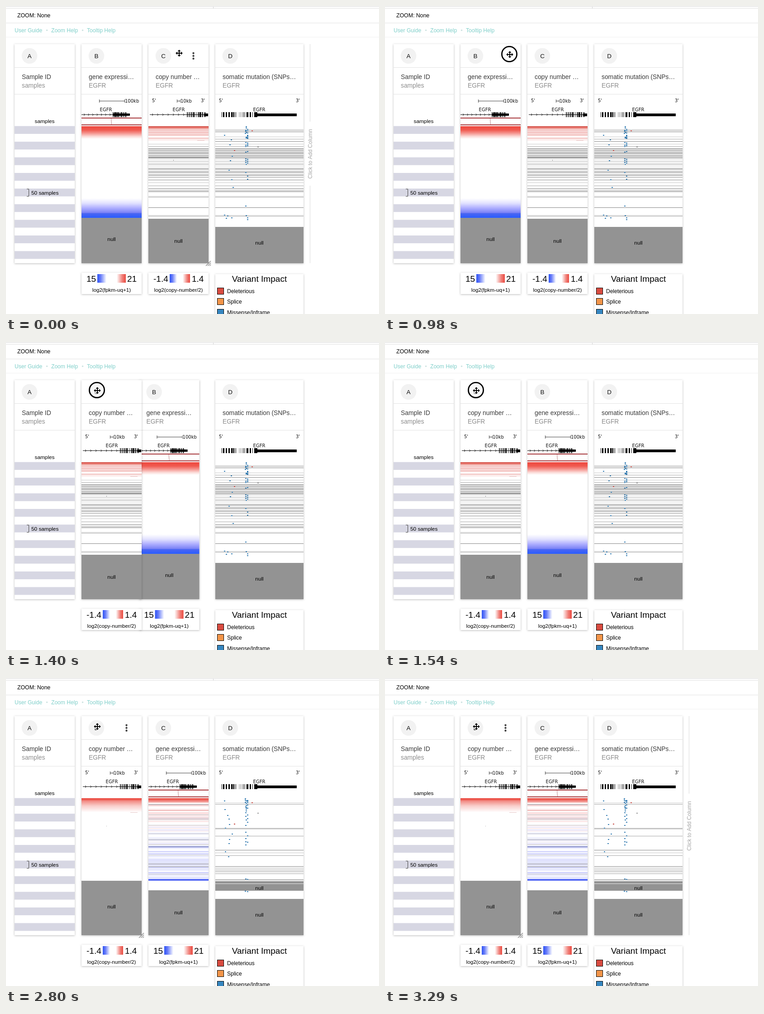
An HTML page with a canvas that plays this animation: 825 by 679 pixels, repeating every 3.36 s.

```html
<!DOCTYPE html>
<html lang="en">
<head>
<meta charset="utf-8">
<title>Column reorder</title>
<style>
html, body { margin: 0; width: 100%; height: 100%; overflow: hidden; background: #fff; }
canvas { display: block; }
</style>
</head>
<body>
<canvas id="stage" width="825" height="679"></canvas>
<script>
const g = document.getElementById('stage').getContext('2d');
const LOOP = 3360, STEP = 70, W = 133;
const SANS = '"Liberation Sans", Arial, sans-serif';
const WIDE = '"DejaVu Sans", sans-serif';
const BLUE = '#3a80b4', RED = '#c9504a';

// progress of a soft move between two times
function ease(t, from, to) {
  const p = Math.min(1, Math.max(0, (t - from) / (to - from)));
  return p * p * (3 - 2 * p);
}
const mix = (a, b, p) => a + (b - a) * p;

function random(seed) {
  return () => (seed = (seed * 16807) % 2147483647) / 2147483647;
}

function rect(x, y, w, h, fill) {
  g.fillStyle = fill;
  g.fillRect(x, y, w, h);
}

function text(s, x, y, size, fill = '#000', align = 'left', family = SANS) {
  g.font = size + 'px ' + family;
  g.textAlign = align;
  g.fillStyle = fill;
  g.fillText(s, x, y);
}
const small = (s, x, y, align) => text(s, x, y, 10, '#111', align, WIDE);

function disc(x, y, r, fill) {
  g.fillStyle = fill;
  g.beginPath();
  g.arc(x, y, r, 0, 7);
  g.fill();
}

function stroke(points, color = '#222') {
  g.strokeStyle = color;
  g.lineWidth = 1;
  g.beginPath();
  for (let i = 0; i < points.length; i += 2) g.lineTo(points[i], points[i + 1]);
  g.stroke();
}

// stops: position, colour, position, colour ...
function fade(x, y, w, h, stops, across) {
  const f = across ? g.createLinearGradient(x, 0, x + w, 0) : g.createLinearGradient(0, y, 0, y + h);
  for (let i = 0; i < stops.length; i += 2) f.addColorStop(stops[i], stops[i + 1]);
  rect(x, y, w, h, f);
}

function panel(x, y, w, h) {
  g.save();
  g.shadowColor = 'rgba(0,0,0,.27)';
  g.shadowBlur = 4;
  g.shadowOffsetY = 1;
  rect(x, y, w, h, '#fff');
  g.restore();
}

function card(x, w, letter, title, sub) {
  panel(x, 84, w, 483);
  rect(x, 135, w, 1, '#e2e2e2');
  rect(x, 194, w, 1, '#e2e2e2');
  disc(x + 33, 110, 17.3, '#f2f2f2');
  text(letter, x + 33, 115, 13.5, '#111', 'center');
  text(title, x + 16, 161, 13.85, '#3a3a3a');
  text(sub, x + 16, 180, 13.8, '#8c8c8c');
}

function nullBlock(x, w, top, bottom, label) {
  rect(x, top, w, bottom - top, '#939393');
  text('null', x + w / 2, label, 11.8, '#000', 'center');
}

function hover(x) {
  for (const y of [104, 110, 116]) disc(x + 99.5, y, 2.2, '#444');
  for (const d of [0, 4, 8]) stroke([x + 127 + d, 573, x + 138, 562 + d], '#333');
}

function exons(from, to, gap, seed, color = '#000') {
  const rnd = random(seed);
  for (let x = from; x < to - 1;) {
    const w = 1 + Math.floor(rnd() * 2.6);
    rect(x, 234, w, 11, color);
    x += w + 1 + Math.floor(rnd() * gap);
  }
}

function intron(from, to, gap) {
  rect(from, 239, to - from, 1, '#111');
  for (let x = from + 5; x < to - 3; x += gap) stroke([x, 237, x + 2.5, 239.5, x, 242]);
}

function scale(from, to, label) {
  rect(from, 209, to - from, 1, '#444');
  rect(from, 206, 1, 7, '#444');
  rect(to, 206, 1, 7, '#444');
  small(label, to + 1, 213);
}

// zones: [first, end, spacing]
function rows(x, w, zones, color = '#000') {
  let n = 0;
  for (const [from, to, gap] of zones)
    for (let y = from; y < to; y += gap) {
      g.globalAlpha = .22 + .13 * (n++ % 3);
      rect(x, Math.floor(y), w, 1, color);
    }
  g.globalAlpha = 1;
}

const dot = (x, y, color = BLUE) => rect(Math.round(x) - 1, Math.round(y) - 1, 3, 2, color);

function dotStack(zones, seed) {
  const rnd = random(seed);
  for (const [from, to, gap] of zones)
    for (let y = from; y < to; y += gap) {
      const r = rnd();
      if (r < .65) dot(529 + rnd() * 2, y);
      if (r > .35) dot(534, y + 1);
    }
}

function strayDots(count, from, to, seed) {
  const rnd = random(seed);
  for (let i = 0; i < count; i++) dot(483 + rnd() * 26, mix(from, to, (i + rnd()) / count));
}

function page() {
  rect(0, 0, 825, 679, '#fff');
  for (const [y, color] of [[1, '#dadada'], [5, '#e0e0e0'], [37, '#e2e2e2'], [68, '#f0f0f0']])
    rect(0, y, 825, 1, color);
  rect(458, 1, 1, 4, '#d0d0d0');
  text('ZOOM: None', 25, 25, 12.3);
  [['User Guide', 19], ['Zoom Help', 100], ['Tooltip Help', 179]].forEach(([s, x], i) => {
    text(s, x, 57.5, 12.1, '#80cfca');
    if (i) disc(x - 9.5, 53.5, 1.8, '#cfe4e2');
  });
}

function sampleColumn() {
  card(19, W, 'A', 'Sample ID', 'samples');
  text('samples', 85.5, 258, 11.8, '#000', 'center');
  for (let i = 0; i < 9; i++) rect(19, 264.7 + i * 34.45, W, 17.2, '#d7d7e3');
  stroke([46, 403.5, 50.5, 403.5, 50.5, 419.5, 46, 419.5], '#444');
  text('50 samples', 56, 415.5, 11.8);
}

function mixedRows(x) {
  const rnd = random(77);
  fade(x, 265, W, 10, [0, '#e8453b', .4, '#ee6a62', 1, '#f7bcb8']);
  for (let y = 274; y < 443; y++) {
    const p = (y - 265) / 180, r = rnd(), a = rnd();
    if (r < .4) continue;
    const warm = rnd() > p * 1.7 - .1;
    const alpha = .06 + a * (warm ? .5 * Math.max(0, 1 - p * 2.3) : .34 * p);
    rect(x, y, W, 1, r > .9 ? 'rgba(70,70,80,.35)' : `rgba(${warm ? '226,70,70' : '70,80,240'},${alpha})`);
  }
  rect(x, 291, W, 1, '#df6763');
  rect(x, 371, W, 2, '#7f87c4');
  rect(x, 443, W, 4, '#5b6ff5');
}

function expression(x, letter, sorted) {
  card(x, W, letter, 'gene expressi…', 'EGFR');
  scale(x + 39, x + 95, '100kb');
  small('EGFR', x + 54, 232, 'center');
  intron(x, x + 69, 9.5);
  exons(x + 69, x + 99, 2, 11);
  rect(x + 69, 237, 38, 5, '#000');
  rect(x, 246, W, 2, '#a83a3e');
  rect(x, 261, W, 2, '#a83a3e');
  stroke([x + 65.5, 248, x + 66.5, 261], '#b98386');
  if (sorted) {
    mixedRows(x);
    nullBlock(x, W, 468, 567, 520.5);
  } else {
    fade(x, 265, W, 28, [0, '#ee473d', .3, '#f05a50', .55, '#f5948e', .8, '#fbd9d6', 1, '#fff']);
    fade(x, 424, W, 43, [0, '#fff', .25, '#e2e2ff', .5, '#aeaeff', .73, '#7c83f6', .78, '#4a65f2', 1, '#295cff']);
    nullBlock(x, W, 467, 567, 517.5);
  }
}

// sample rows without a call, shared by two columns
const greyZones = [[304, 314, 5], [314, 336, 1.8], [339, 356, 4.5], [357, 379, 2.4],
  [383, 404, 6.6], [405, 411, 2], [419, 422, 2], [444, 445, 1], [461, 464, 2]];

function copyNumber(x, letter, sorted) {
  card(x, W, letter, 'copy number …', 'EGFR');
  small("5'", x + 8, 211.5);
  small("3'", x + 116, 211.5);
  scale(x + 63, x + 70, '10kb');
  small('EGFR', x + 67, 232, 'center');
  intron(x + 3, x + 85, 11.5);
  exons(x + 85, x + 127, 3, 23);
  rect(x + 85, 239, 46, 1, '#000');
  rect(x + 123, 237, 9, 6, '#000');
  rect(x + 108, 296, 16, 1, '#e6c8c8');
  if (sorted) {
    fade(x, 265, W, 31, [0, '#ea4238', .12, '#ee6259', .2, '#f28c85', .55, '#f9cecb', 1, '#fff']);
    rect(x + 55, 326, 1, 1, '#999');
    nullBlock(x, W, 447, 567, 508);
  } else {
    fade(x, 265, W, 7, [0, '#c9473f', .3, '#e2635a', .6, '#eb8d86', 1, '#f6cfcc']);
    rows(x, W, [[272, 286, 1.5], [290, 296, 2.5]], '#d8322c');
    rows(x, W, greyZones);
    rect(x, 333, W, 2, 'rgba(0,0,0,.25)');
    rect(x + 55, 339, 1, 2, '#777');
    nullBlock(x, W, 469, 567, 521.5);
  }
}

function mutation(sorted) {
  const x = 463, w = 195;
  card(x, w, 'D', 'somatic mutation (SNPs…', 'EGFR');
  small("5'", 471, 211.5);
  small("3'", 641, 211.5);
  small('EGFR', 560, 232, 'center');
  exons(477, 513, 3, 41);
  exons(513, 523, 2, 5, '#c4c4c4');
  exons(524, 556, 3, 19);
  rect(552, 234, 4, 11, '#000');
  rect(556, 237, 87, 6, '#000');
  if (sorted) {
    rows(x, w, [[275, 279, 3], [331, 335, 2], [348, 349, 1], [379, 392, 6], [415, 433, 3.4], [444, 447, 2]]);
    nullBlock(x, w, 448, 469, 467);
    rect(x, 453, w, 1, '#e8e8e8');
    dotStack([[266, 291, 2.5], [293, 320, 4], [325, 328, 3], [340, 372, 7], [443, 444, 1], [470, 471, 1]], 31);
    strayDots(11, 270, 400, 8);
  } else {
    rows(x, w, [[272, 279, 2.5], [288, 300, 5], ...greyZones]);
    dotStack([[266, 293, 2.5], [301, 311, 3], [320, 323, 2], [337, 350, 4], [367, 385, 7], [441, 442, 1], [462, 471, 4]], 52);
    strayDots(8, 270, 410, 14);
    strayDots(4, 460, 470, 3);
  }
  dot(544, 275, RED);
  dot(505, sorted ? 322 : 319, RED);
  dot(557, sorted ? 298 : 311, '#999');
  nullBlock(x, w, 487, 567, 525.5);
}

function rangeLegend(x, low, high, blue, red, width, highX, caption) {
  text(low, x + 11, 608, 19);
  fade(x + blue, 591, width, 19, [0, '#2f55f5', .35, '#6479f8', 1, '#fff'], true);
  fade(x + red, 591, width, 19, [0, '#fff', .6, '#f0827b', 1, '#ea4a40'], true);
  text(high, x + highX, 608, 19);
  text(caption, x + W / 2, 630, 11.7, '#000', 'center');
}

// contents blend, so overlapping legends both stay visible
function legends(exprX, copyX) {
  panel(exprX, 588, W, 47);
  panel(copyX, 588, W, 47);
  g.globalCompositeOperation = 'multiply';
  rangeLegend(exprX, '15', '21', 35, 78, 20, 101, 'log2(fpkm-uq+1)');
  rangeLegend(copyX, '-1.4', '1.4', 47, 76, 16, 96, 'log2(copy-number/2)');
  g.globalCompositeOperation = 'source-over';

  panel(463, 591, 195, 100);
  text('Variant Impact', 560.5, 608, 19.1, '#000', 'center');
  [['Deleterious', '#d94c41'], ['Splice', '#f3954a'], ['Missense/Inframe', '#3686c0']].forEach(([label, fill], i) => {
    const y = Math.round(621 + i * 23.3);
    rect(467, y, 15, 15, '#000');
    rect(468, y + 1, 13, 13, fill);
    text(label, 489, y + 11.7, 12);
  });
}

function addColumn(alpha) {
  g.save();
  g.globalAlpha = alpha;
  rect(672, 84, 1, 171, '#dcdcdc');
  rect(672, 396, 1, 171, '#dcdcdc');
  g.translate(677, 326);
  g.rotate(-Math.PI / 2);
  text('Click to Add Column', 0, 0, 12.1, '#a6a6a6', 'center');
  g.restore();
}

function pointer(x, y, pressed) {
  if (pressed) {
    disc(x - 1, y - 1, 17, 'rgba(255,255,255,.5)');
    g.strokeStyle = '#000';
    g.lineWidth = 2.8;
    g.beginPath();
    g.arc(x - 1, y - 1, 16.6, 0, 7);
    g.stroke();
  }
  const arm = new Path2D('M-1 0V-4H-3.5L0 -7.8 3.5 -4H1V0Z');
  g.strokeStyle = '#fff';
  g.lineWidth = 2;
  g.fillStyle = '#000';
  for (const paint of ['stroke', 'fill'])
    for (let i = 0; i < 4; i++) {
      g.save();
      g.translate(x, y);
      g.rotate(i * Math.PI / 2);
      g[paint](arm);
      g.restore();
    }
}

function draw(t) {
  const swapped = t >= 2590, sorted = t >= 2730;
  const copyX = mix(315, 167, ease(t, 980, 1190));
  const exprX = mix(167, 315, ease(t, 1170, 1470));
  const approach = ease(t, 0, 490);
  const drag = ease(t, 770, 1190);

  page();
  sampleColumn();
  mutation(sorted);
  expression(exprX, swapped ? 'C' : 'B', sorted);
  copyNumber(copyX, swapped ? 'B' : 'C', sorted);
  if (t < 700 || swapped) hover(copyX);
  legends(exprX, copyX);
  addColumn(t < 1500 ? 1 - ease(t, 630, 910) : ease(t, 2940, 3220));
  pointer(mix(mix(383, 350, approach), 202, drag), mix(104, 107, approach), t >= 630 && t < 1820);
}

function tick(now) {
  const t = now % LOOP;
  draw(t - t % STEP);
  requestAnimationFrame(tick);
}
draw(0);
requestAnimationFrame(tick);
</script>
</body>
</html>
```
